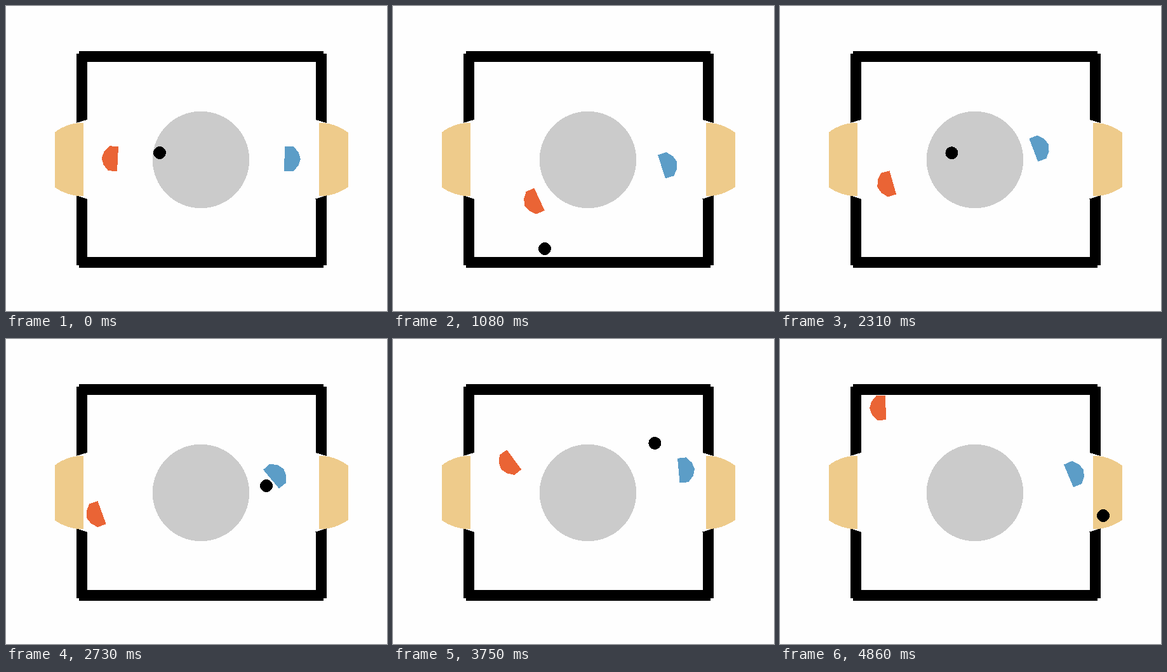
Write an HTML page that moves like this. It is 600 px wide and 480 px high and loops after 4.89 s.

```html
<!DOCTYPE html>
<html lang="en">
<head>
<meta charset="utf-8">
<title>Table hockey</title>
<style>
  html, body { margin: 0; width: 100%; height: 100%; overflow: hidden; background: #fefefe; }
  svg { display: block; width: 600px; height: 480px; shape-rendering: crispEdges; }
</style>
</head>
<body>
<svg viewBox="0 0 600 480">
  <defs>
    <g id="side">
      <path d="M310 71H115V75H110.500V184L127.500 179V88H310ZM310 411.500H115V408H110.500V298L127.500 303.500V395H310Z"/>
      <path fill="#eecb8b" d="M122 183.500Q96 184 76.500 199V285Q96 299 122 299.500Z"/>
    </g>
    <path id="paddle" d="M0-19.300L-14-19.600L-22-10.500L-25.500 0L-22 10.500L-14 19.600L0 19.300Z"/>
  </defs>
  <use href="#side"/>
  <use href="#side" transform="translate(615) scale(-1 1)"/>
  <circle cx="307" cy="242" r="76.300" fill="#cbcbcb"/>
  <g id="orange" fill="#ea6435"><use href="#paddle"/></g>
  <g id="blue" fill="#5c9dc7"><use href="#paddle" transform="scale(-1 1)"/></g>
  <circle id="puck" r="10"/>
</svg>
<script>
const LOOP = 4890, STEP = 30;
const LEFT = 137, TOP = 97, BOTTOM = 384; // where the puck's centre bounces

// Pushes: x, y, angle of each paddle, held by the middle of its flat edge.
const pushes = [
  { t: 0, orange: [176, 240.5, 3], blue: [438.5, 240.5, 1.5] },
  { t: 1080, orange: [230.5, 304, -25], blue: [423, 253, -18] },
  { t: 1890, orange: [152.5, 345.5, -4.5], blue: [464, 241.5, 37] },
  { t: 2730, orange: [151, 273, -20], blue: [417.5, 220.5, -40] },
  { t: 3330, orange: [168, 270, -34], blue: [465, 235, 37] },
  { t: 4230, orange: [174, 161, -37.5], blue: [465, 220.5, -22] },
  { t: 4860, orange: [166.5, 108, -1.5], blue: [454.5, 215.5, -23] }
];

// Puck shots aim straight, also beyond a wall; the walls fold them back.
const shots = [
  { t: 0, at: [242, 231] },
  { t: 90, at: [188, 236] },
  { t: 720, at: [410, 512] },
  { t: 1080, at: [239, 382] },
  { t: 1620, at: [106, 379] },
  { t: 1890, at: [361, 180] },
  { t: 2110, at: [446, 14] },
  { t: 2430, at: [165, 262] },
  { t: 2730, at: [410, 231] },
  { t: 3330, at: [180, 249] },
  { t: 3800, at: [440, 4] },
  { t: 4460, at: [210, 133] },
  { t: 4860, at: [509, -84] }
];

const mix = (a, b, u) => a.map((v, k) => v + (b[k] - v) * u);
const easeOut = u => u * (2 - u);

const fold = ([x, y]) => [
  Math.abs(x - LEFT) + LEFT,
  BOTTOM - Math.abs(BOTTOM - TOP - Math.abs(y - TOP))
];

function span(keys, t) {
  const i = Math.max(1, keys.findIndex(k => k.t >= t));
  const a = keys[i - 1], b = keys[i];
  return { a, b, u: (t - a.t) / (b.t - a.t) };
}

function puckAt(t) {
  const { a, b, u } = span(shots, t);
  return fold(mix(fold(a.at), b.at, u));
}

// A push fades out, and between pushes a paddle leans toward a near puck.
function paddleAt(name, t, [px, py]) {
  const { a, b, u } = span(pushes, t);
  const [x, y, angle] = mix(a[name], b[name], easeOut(u));
  const near = Math.max(0, 1 - Math.hypot(px - x, py - y) / 300);
  const lean = 0.4 * near * Math.sin(Math.PI * u) ** 2;
  return [x + (px - x) * lean, y + (py - y) * lean, angle];
}

const place = (id, [x, y, angle = 0]) =>
  document.getElementById(id).setAttribute("transform", `translate(${x} ${y}) rotate(${angle})`);

function tick() {
  const t = Math.floor((performance.now() % LOOP) / STEP) * STEP;
  const puck = puckAt(t);
  place("puck", puck);
  for (const name of ["orange", "blue"]) place(name, paddleAt(name, t, puck));
  requestAnimationFrame(tick);
}
tick();
</script>
</body>
</html>
```
